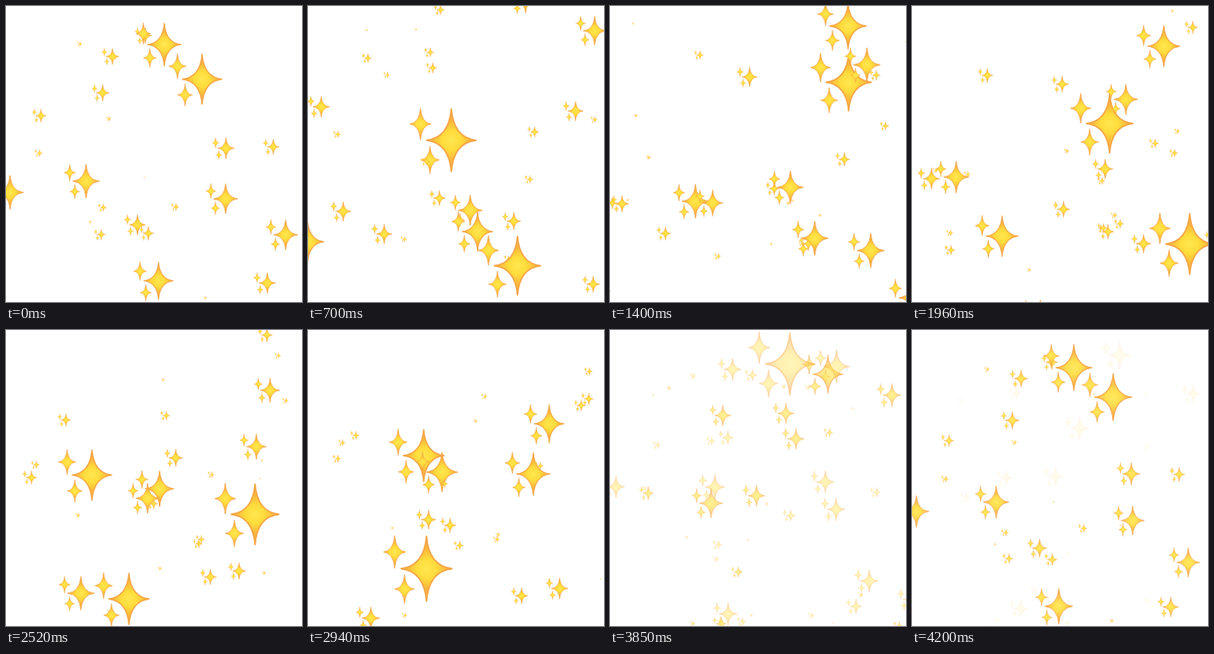
An HTML page with a canvas for the animation above (4270 ms loop, 370 px wide and 370 px high).

```html
<!DOCTYPE html>
<html lang="en">
<head>
<meta charset="utf-8">
<title>Sparkles</title>
<style>
  html, body { margin: 0; width: 100%; height: 100%; overflow: hidden; background: #fff; }
  canvas { display: block; }
</style>
</head>
<body>
<canvas id="stage" width="370" height="370"></canvas>
<script>
const ctx = document.getElementById('stage').getContext('2d');
const SIZE = 370, LOOP = 4270, STEP = 70, FADE = 700, HALF_LIFE = 1700;

// Peak time (ms), centre x and y then, velocity x and y (px/s), peak size
const large = [
  [1100, 211, 239, 32, -41, 50],
  [2750, 120, 168, 88, -58, 74],
  [1700, 262, 123, -92, 92, 88],
  [3000, 160, 173, -26, -78, 52],
  [1600, 297, 34, 32, 45, 66],
  [1600, 297, 89, -95, 77, 48],
  [500, 189, 146, -97, 109, 90],
  [650, 248, 326, 97, -27, 77],
  [-800, 237, 37, -57, 14, 102],
  [0, 95, 219, -77, 54, 42],
  [950, 222, 285, 64, 12, 58],
  [0, 345, 286, 58, -66, 38],
  [0, 270, 241, -22, 40, 38],
  [500, -5, 277, -10, 88, 60],
  [2100, 102, 298, -32, 74, 56],
  [2240, 320, 264, -64, -120, 92],
  [3400, 281, 86, -32, -68, 66],
  [2900, 139, 302, -18, -90, 84]
];

function seeded(seed) {
  return () => {
    seed = (seed * 16807) % 2147483647;
    return seed / 2147483647;
  };
}

const rand = seeded(4821);
const span = (a, b) => a + (b - a) * rand();
const small = Array.from({ length: 50 }, (_, i) => [
  -1900 + i * 150, span(5, 365), span(5, 365), span(-70, 70), span(-70, 70), span(8, 32)
]);
const sparkles = [...small, ...large];

// Unit star: one pixel high, pinched between its four tips
function starPath(width) {
  const w = width / 2, h = 0.5, c = 0.035;
  const path = new Path2D();
  path.moveTo(0, -h);
  path.quadraticCurveTo(c, -c, w, 0);
  path.quadraticCurveTo(c, c, 0, h);
  path.quadraticCurveTo(-c, c, -w, 0);
  path.quadraticCurveTo(-c, -c, 0, -h);
  return path;
}
const wide = starPath(0.79), narrow = starPath(0.68);

const gold = ctx.createRadialGradient(0, 0, 0, 0, 0, 0.5);
gold.addColorStop(0, '#ffe750');
gold.addColorStop(0.3, '#ffdc3c');
gold.addColorStop(0.6, '#fbb83c');
gold.addColorStop(1, '#f4a04c');

function star(x, y, height, path) {
  ctx.save();
  ctx.translate(x, y);
  ctx.scale(height, height);
  ctx.fillStyle = gold;
  ctx.fill(path);
  ctx.lineWidth = 0.022;
  ctx.strokeStyle = '#f5a545';
  ctx.stroke(path);
  ctx.restore();
}

function sparkle([peak, x, y, vx, vy, size], t) {
  const age = t - peak;
  const s = size * (1 - Math.abs(age) / HALF_LIFE);
  if (s < 2) return;
  const cx = x + vx * age / 1000 + 0.12 * s;
  const cy = y + vy * age / 1000;
  star(cx - 0.485 * s, cy - 0.255 * s, 0.5 * s, narrow);
  star(cx - 0.335 * s, cy + 0.31 * s, 0.44 * s, narrow);
  star(cx, cy, s, wide);
}

function scene(t, alpha) {
  ctx.globalAlpha = alpha;
  sparkles.forEach(p => sparkle(p, t));
}

// The end of the loop dissolves into the moments before its start
function draw(now) {
  const t = Math.floor((now % LOOP) / STEP) * STEP;
  const mix = Math.max(0, (t - (LOOP - FADE)) / FADE);
  ctx.clearRect(0, 0, SIZE, SIZE);
  scene(t, 1 - mix);
  if (mix > 0) scene(t - LOOP, mix);
}

const start = performance.now();
function tick() {
  draw(performance.now() - start);
  requestAnimationFrame(tick);
}
tick();
</script>
</body>
</html>
```
